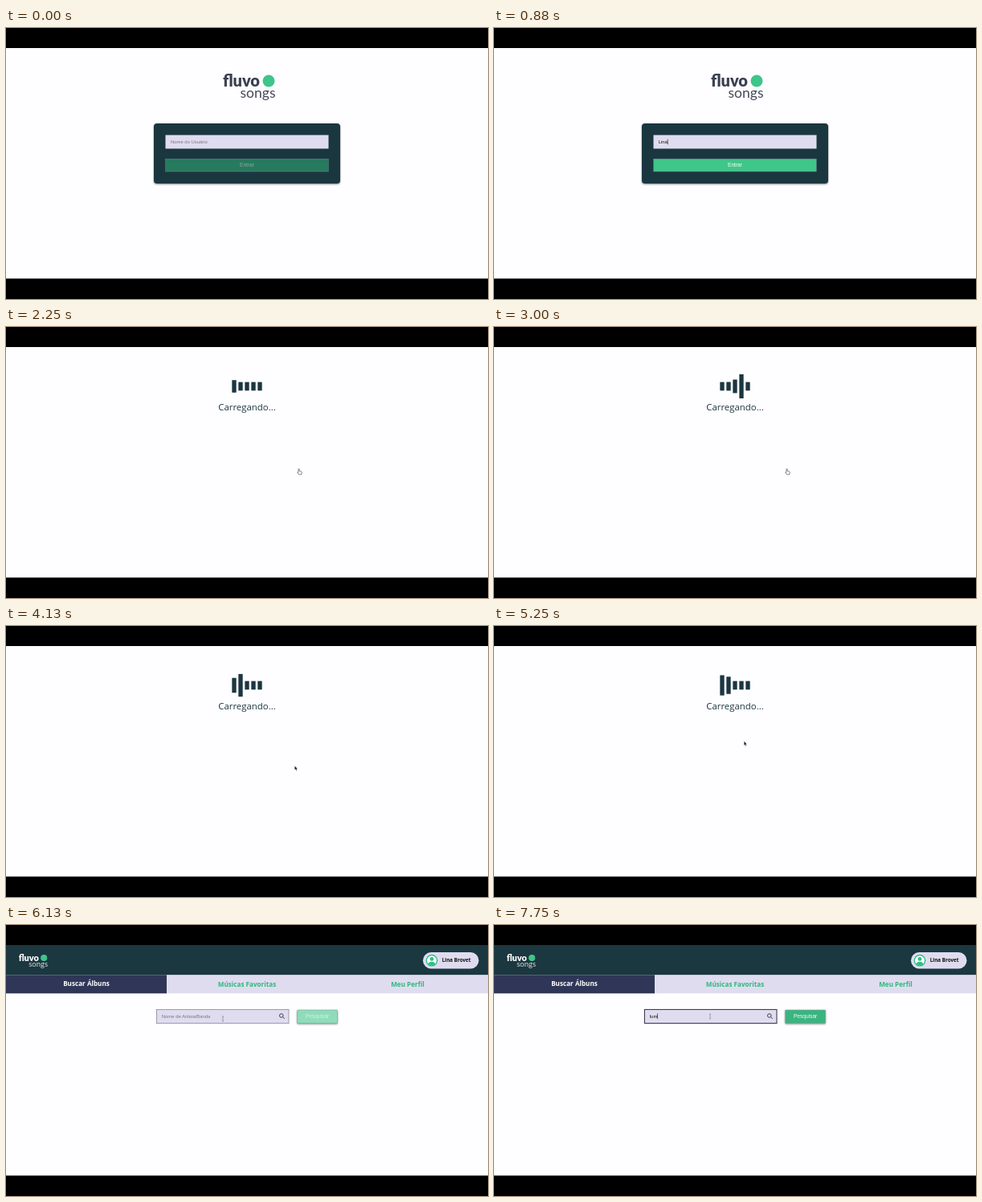
An HTML page that plays this animation: 600 px wide and 338 px high, repeating every 8000 ms.

```html
<!DOCTYPE html>
<html lang="pt-BR">
<head>
<meta charset="utf-8">
<title>fluvo songs</title>
<style>
  html, body { margin: 0; width: 100%; height: 100%; overflow: hidden; background: #000; }
  svg { display: block; width: 100%; height: 100%; }
  text { font-family: "Liberation Sans", Arial, sans-serif; font-size: 5.9px; white-space: pre; }
  .ui { font-family: "Open Sans", "Noto Sans", sans-serif; }
  .logo { font-family: Lato, sans-serif; font-weight: 900; }
  .thin { font-family: Lato, sans-serif; font-weight: 400; }
  .tab { font-size: 8.15px; font-weight: 700; }
  .mid { text-anchor: middle; }
  .btn { font-size: 6.6px; text-anchor: middle; }
  .hint { fill: #77757f; }
  .field { fill: #e0dcf0; }
  .card { filter: drop-shadow(0 1px 1.2px rgba(0, 0, 0, .45)); }
</style>
</head>
<body>
<svg viewBox="0 0 600 338">
  <rect width="600" height="338"/>
  <rect y="25" width="600" height="287.5" fill="#fefdff"/>

  <g id="login">
    <text class="logo" x="316" y="73" text-anchor="end" fill="#3a3f50" style="font-size:20px">fluvo</text>
    <circle cx="327" cy="66" r="7.5" fill="#3ec58a"/>
    <text class="thin" x="335.5" y="87" text-anchor="end" fill="#454a5a" style="font-size:17.5px">songs</text>
    <rect class="card" x="184" y="119" width="232" height="75" rx="4" fill="#1a3740"/>
    <rect class="field" x="198.5" y="133.5" width="203" height="17"/>
    <text id="nameHint" class="hint" x="205" y="144">Nome do Usuário</text>
    <text id="name" x="204.7" y="144" fill="#111"></text>
    <rect id="nameCaret" y="138.7" width=".6" height="6.6"/>
    <rect id="enter" x="198.7" y="163.2" width="202.6" height="15.8" stroke="#6d8685" stroke-width=".5"/>
    <text id="enterText" class="btn" x="300" y="173">Entrar</text>
  </g>

  <g id="loading" fill="#1b3640">
    <g id="bars"></g>
    <text class="ui mid" x="300" y="104.3" style="font-size:11.4px">Carregando...</text>
  </g>

  <g id="search">
    <rect y="25" width="600" height="37.5" fill="#1b3740"/>
    <text class="logo" x="41" y="45" text-anchor="end" fill="#fff" style="font-size:11px">fluvo</text>
    <circle cx="47.2" cy="41" r="4.1" fill="#3ec58a"/>
    <text class="thin" x="52" y="52.4" text-anchor="end" fill="#d5dcdf" style="font-size:9.5px">songs</text>
    <rect class="field" x="519" y="34" width="69.5" height="20.5" rx="10.2"/>
    <circle cx="530" cy="44.2" r="6.7" fill="#fff" stroke="#2fbf85" stroke-width="1.4"/>
    <circle cx="530" cy="42.4" r="2.4" fill="#2fbf85"/>
    <path d="M525.6 48.8a4.5 3.8 0 0 1 8.8 0q-4.4 3.2-8.8 0z" fill="#2fbf85"/>
    <text class="ui" x="542.7" y="46.4" font-weight="700" fill="#111" style="font-size:6.3px">Lina Brovet</text>
    <rect class="field" y="62.3" width="600" height="23"/>
    <rect y="62.3" width="200" height="23" fill="#2f3657"/>
    <text class="ui tab mid" x="100" y="76" fill="#fff">Buscar Álbuns</text>
    <text class="ui tab mid" x="300" y="77" fill="#2eb87e">Músicas Favoritas</text>
    <text class="ui tab mid" x="500" y="77" fill="#2eb87e">Meu Perfil</text>
    <rect id="box" class="field" x="187.4" y="105.4" width="164.6" height="17.2"/>
    <text id="queryHint" class="hint" x="193.8" y="116">Nome de Artista/Banda</text>
    <text id="query" x="193.8" y="116" fill="#111"></text>
    <rect id="queryCaret" y="110.3" width=".6" height="6.8"/>
    <g fill="none" stroke="#33313d" stroke-width=".9">
      <circle cx="342.8" cy="113" r="2.3"/>
      <path d="M344.5 114.7l2.3 2.3"/>
    </g>
    <rect id="find" class="card" x="362.6" y="106" width="50" height="16.4" rx=".6" stroke="#7d9d92" stroke-width=".5"/>
    <text id="findText" class="btn" x="387.6" y="116.2">Pesquisar</text>
  </g>

  <g id="hand"><path d="M-.6.3Q0-.6.7.3V2.7L3.2 3.3Q4 3.6 3.8 4.6L3.2 7H.2L-1.6 4.6Q-1.9 3.7-.6 4.1z" fill="#fff" stroke="#333" stroke-width=".6"/></g>
  <g id="arrow"><path d="M0 0V5.1L1.2 4 2 5.9 2.8 5.5 2 3.7H3.5z" fill="#111" stroke="#fff" stroke-width=".2"/></g>
  <g id="beam"><path d="M-1 0H1M0 0V6M-1 6H1" fill="none" stroke="#77747f" stroke-width=".6"/></g>
</svg>
<script>
const $ = id => document.getElementById(id);
const show = (id, on) => $(id).style.display = on ? "" : "none";
const paint = (id, color) => $(id).setAttribute("fill", color);

const USER = "Lina Brovet", QUERY = "lum";
const LOOP = 8000, TICK = 125;
const LOAD = 2250, RELOAD = 3765, READY = 5375;

// Pointer stops: time, x, y
const PATH = [
  [1500, 345, 166], [1750, 364.5, 177], [3125, 364.5, 177], [3875, 361, 175.5],
  [4125, 359.4, 174.5], [4875, 359.4, 174.5], [5250, 311.3, 143.8],
  [5625, 282, 132], [6125, 270, 114], [6250, 269, 111]
];

for (let i = 0; i < 5; i++) {
  const bar = document.createElementNS("http://www.w3.org/2000/svg", "rect");
  bar.setAttribute("x", 281.33 + i * 8);
  bar.setAttribute("width", 5.33);
  $("bars").append(bar);
}

const cubic = (u, a, b) => 3 * u * (1 - u) ** 2 * a + 3 * u * u * (1 - u) * b + u ** 3;

function ease(x, x1, y1, x2, y2) {
  let lo = 0, hi = 1;
  for (let i = 0; i < 20; i++) {
    const m = (lo + hi) / 2;
    if (cubic(m, x1, x2) < x) lo = m; else hi = m;
  }
  return cubic(lo, y1, y2);
}

// Each bar rises for 0.24 s, falls until 0.6 s, then rests until 1.2 s
function pulse(ms) {
  if (ms < 0) return 0;
  const p = ms % 1200;
  if (p < 240) return ease(p / 240, .2, .2, .4, .8);
  if (p < 600) return 1 - ease((p - 240) / 360, .2, .6, .4, .8);
  return 0;
}

function drawBars(t) {
  const start = t < RELOAD ? 2210 : RELOAD;
  [...$("bars").children].forEach((bar, i) => {
    const h = 10.67 + 21.33 * pulse(t - start - i * 200);
    bar.setAttribute("y", 74 - h / 2);
    bar.setAttribute("height", h);
  });
}

function type(id, value, caretOn) {
  const el = $(id);
  el.textContent = value;
  show(id + "Hint", !value);
  show(id + "Caret", caretOn);
  const end = value ? el.getComputedTextLength() : 0;
  $(id + "Caret").setAttribute("x", +el.getAttribute("x") + end);
}

function pointer(t) {
  let i = 0;
  while (i < PATH.length - 2 && PATH[i + 1][0] <= t) i++;
  const [t0, x0, y0] = PATH[i], [t1, x1, y1] = PATH[i + 1];
  const k = Math.min(1, Math.max(0, (t - t0) / (t1 - t0)));
  const shape = t < 1500 ? "" : t < 3250 ? "hand" : t < 6000 ? "arrow" : "beam";
  for (const id of ["hand", "arrow", "beam"]) {
    show(id, id === shape);
    $(id).setAttribute("transform", `translate(${x0 + (x1 - x0) * k} ${y0 + (y1 - y0) * k})`);
  }
}

function draw(t) {
  show("login", t < LOAD);
  show("loading", t >= LOAD && t < READY);
  show("search", t >= READY);

  if (t < LOAD) {
    const n = t < 750 ? 0 : Math.min(USER.length, Math.ceil((t - 625) / 75));
    type("name", USER.slice(0, n), n > 0 && t < 1500);
    paint("enter", n > 2 ? "#40c688" : "#277a5d");
    paint("enterText", n > 2 ? "#f4fff9" : "#8ba79f");
  } else if (t < READY) {
    drawBars(t);
  } else {
    const n = [7375, 7500, 7750].filter(at => t >= at).length;
    const focus = t >= 6250;
    type("query", QUERY.slice(0, n), focus && (t < 6875 || n > 0));
    $("box").setAttribute("stroke", focus ? "#2d2b45" : "#8b8894");
    $("box").setAttribute("stroke-width", focus ? 1 : .8);
    paint("find", n > 1 ? "#3bb481" : "#8fdcbb");
    paint("findText", n > 1 ? "#f2fff8" : "#d3f3e4");
  }
  pointer(t);
}

function frame() {
  const t = performance.now() % LOOP;
  draw(Math.floor(t / TICK) * TICK);
  requestAnimationFrame(frame);
}
frame();
</script>
</body>
</html>
```
